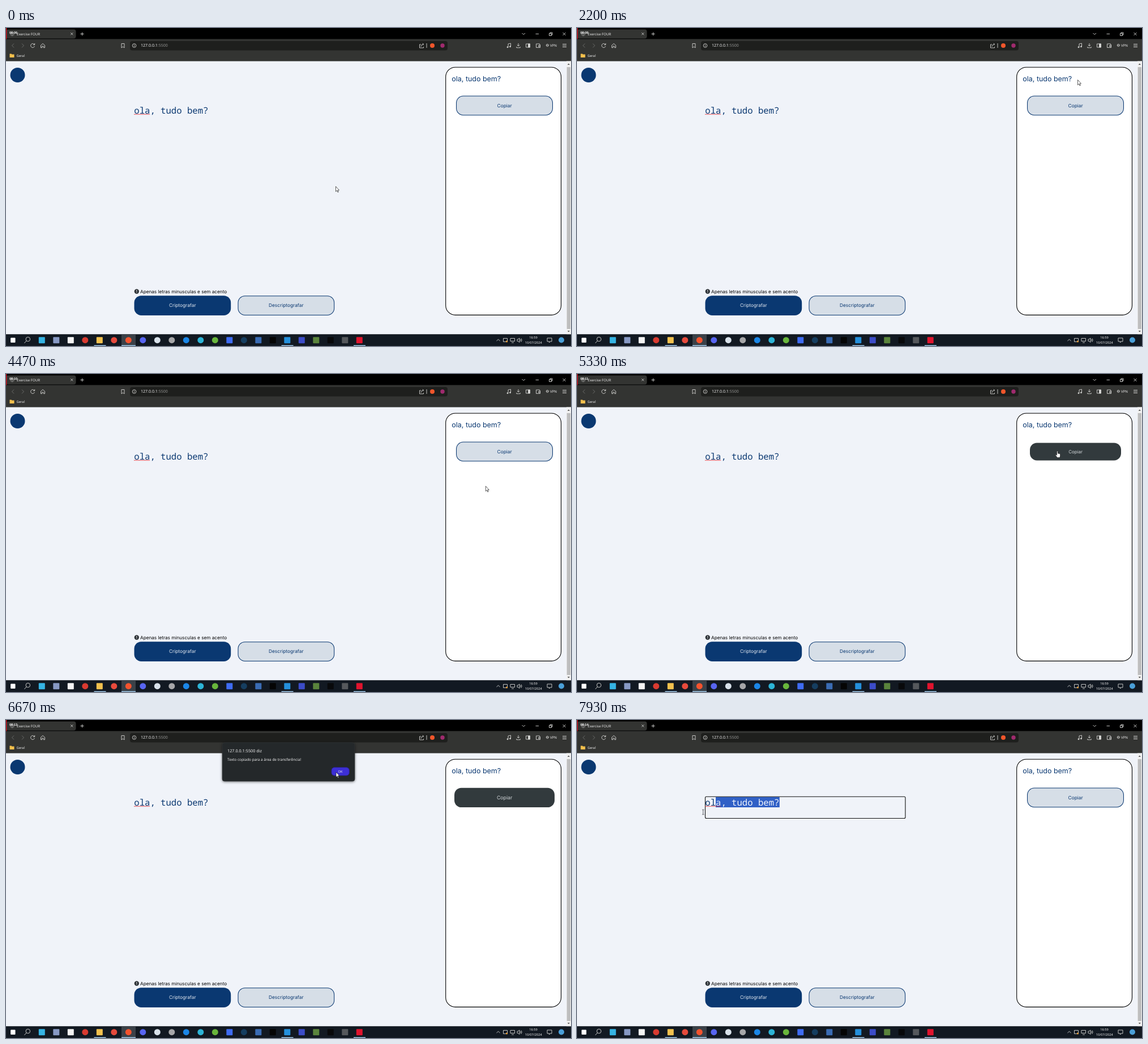
Animation of 998 by 561 pixels, one loop 8000 ms. Source, as an HTML page:

```html
<!DOCTYPE html>
<html lang="pt-BR">
<head>
<meta charset="utf-8">
<title>Exercise FOUR</title>
<style>
  html, body { margin: 0; width: 100%; height: 100%; overflow: hidden; background: #000; }
  svg { display: block; width: 998px; height: 561px; }
  text { font-family: "Noto Sans", sans-serif; font-size: 6.1px; fill: #eee; text-rendering: geometricPrecision; }
  .page text { font-family: Inter, sans-serif; font-size: 8.32px; fill: #0a3871; }
  .page .mono { font-family: "Noto Sans Mono", monospace; font-size: 15.62px; }
  .page .result { font-size: 12.48px; }
  .mid { text-anchor: middle; }
  .icons { fill: none; stroke: #d4d4d2; stroke-width: .9; }
  .dim { stroke: #70716f; }
</style>
</head>
<body>
<svg viewBox="0 0 998 561">
  <!-- browser window -->
  <rect width="998" height="20"/>
  <rect y="19.5" width="998" height="39" fill="#333432"/>
  <rect y="2.5" width="123.5" height="16" rx="4" fill="#333432"/>
  <rect x="219" y="23" width="561" height="16.5" rx="4" fill="#1e1f1d"/>
  <g class="icons">
    <g stroke="#8c8c8c" stroke-width=".7"><circle cx="11" cy="10.5" r="3.4"/><path d="M7.6 10.5h6.8M11 7q-3 3.5 0 7q3-3.5 0-7"/></g>
    <path d="M114.3 8.3l4 4m0-4l-4 4M131.500 10.500h6m-3-3v6M911.500 9l2.700 2.700L917 9M935.500 10.500h5.500M959.500 9.500h4v4h-4zM961 9.500V8h4v4h-1.500M983.500 8l5 5m0-5l-5 5"/>
    <path class="dim" d="M14 27.500L10.500 31l3.500 3.500M28 27.500l3.500 3.500-3.500 3.500"/>
    <path d="M50 29a3.500 3.500 0 1 0 .5 3M50.700 27v2.700H48M61.500 30.500L65 27.500l3.500 3v4.200h-2.200v-2.500h-2.600v2.500h-2.200zM204 27.500h5v7.500l-2.500-2-2.500 2z"/>
    <circle cx="226.500" cy="31" r="3.300"/><path d="M226.500 30.500v2.300M226.500 28.700v.9"/>
    <path d="M733 29h-2.500v6h7v-2M733 33q0-4 4.500-4.300M735.800 27l2 1.700-2 1.700M743 27v8"/>
    <path d="M887 33.500v-5.500l4.500-1v5.500"/><g fill="#d4d4d2"><circle cx="886" cy="33.800" r="1"/><circle cx="890.500" cy="32.800" r="1"/></g>
    <path d="M905 27v5m-2.200-2.200L905 32l2.200-2.200M901.800 33v1.800h6.400V33M918.500 28h7v6h-7z"/><path d="M922.500 28h3v6h-3z" fill="#d4d4d2"/>
    <path d="M936.500 28h6v1.500h1v5h-7zM940.500 31h3v1.800h-3z"/>
    <circle cx="956.300" cy="30.500" r="2"/><path d="M954.300 30.500h4" stroke-width=".6"/>
    <path d="M983 28.500h7M983 31h7M983 33.500h7"/>
  </g>
  <circle cx="753" cy="31" r="4" fill="#f1562b"/>
  <circle cx="771" cy="31" r="3.700" fill="#a02a6e"/>
  <path d="M6.500 45.500h3l1 1h4v5.500h-8z" fill="#f3c04c"/>
  <text x="19" y="12.500">Exercise FOUR</text>
  <text x="238" y="33.400" style="font-size:7.05px">127.0.0.1<tspan fill="#929391">:5500</tspan></text>
  <text x="18.500" y="51" style="font-size:5.8px">Geral</text>
  <text x="961" y="32.800">VPN</text>
  <path d="M.7 0v19.500" stroke="#c8101c" stroke-width="1.400"/>
  <text id="timer" x="6" y="9.700" style="font:bold 5.500px 'Liberation Sans',sans-serif;fill:#fff"></text>

  <!-- page -->
  <g class="page">
    <rect y="58.500" width="998" height="482" fill="#f0f3f9"/>
    <rect x="990" y="58.500" width="8" height="482" fill="#f1f1f1"/>
    <rect x="990.700" y="69" width="6.300" height="462" fill="#bebebe"/>
    <path d="M991.700 65l2.100-2.500 2.100 2.500zM991.700 534l2.100 2.500 2.100-2.500z" fill="#555"/>
    <circle cx="20.500" cy="83" r="13" fill="#0a3871"/>
    <rect id="outline" x="226.500" y="135.300" width="353.500" height="38.200" rx="2" fill="none" stroke="#101010" stroke-width="1.100"/>
    <text class="mono" x="226.300" y="150.700">ola, tudo bem?</text>
    <clipPath id="clip"><rect id="clipBox" y="135.800" height="18.400"/></clipPath>
    <g clip-path="url(#clip)">
      <rect x="226" y="135.800" width="133" height="18.400" fill="#3060c6"/>
      <text class="mono" x="226.300" y="150.700" style="fill:#f2f5fc">ola, tudo bem?</text>
    </g>
    <path id="squiggle" fill="none" stroke="#e0343c" stroke-width=".7"/>
    <circle cx="230.800" cy="464.800" r="4.200" fill="#30353a"/>
    <path d="M230.800 462.300v2.800m0 1v1.100" stroke="#fff" stroke-width="1"/>
    <text x="237" y="468" style="font-size:8.200px;fill:#000">Apenas letras minusculas e sem acento</text>
    <rect x="226.500" y="472.200" width="170.700" height="34.700" rx="12.500" fill="#0a3871"/>
    <text class="mid" x="311.800" y="492.400" style="fill:#dfe5ee">Criptografar</text>
    <rect x="410" y="472.700" width="169.700" height="33.700" rx="12" fill="#d6dee7" stroke="#0a3871" stroke-width="1.050"/>
    <text class="mid" x="494.800" y="492.400">Descriptografar</text>
    <rect x="776.700" y="69.200" width="203.800" height="437.200" rx="17" fill="#fff" stroke="#000" stroke-width="1.100"/>
    <text class="result" x="787.300" y="93.600">ola, tudo bem?</text>
    <rect id="copy" rx="12.300"/>
    <text id="copyLabel" class="mid" y="3">Copiar</text>
  </g>

  <!-- taskbar -->
  <rect y="540.500" width="998" height="20.500" fill="#121922"/>
  <rect x="204" y="540.500" width="25" height="20.500" fill="#3b4148"/>
  <path d="M155.500 560.200h21M204 560.200h25M486.500 560.200h21M614 560.200h21" stroke="#9cc4e4" stroke-width="1.400"/>
  <g id="apps"></g>
  <g class="icons" stroke-width="1">
    <circle cx="38.800" cy="549" r="3.800"/><path d="M36 552l-3.700 4"/>
    <path d="M866.500 552l3-2.700 3 2.700M878.500 547.500h7v6h-7zM891 547.500h7.500v5H891zM893 555h4M956 547h8v6h-3l-1.500 2v-2H956z"/>
    <path d="M903 549h1.500l2.500-2v7.500l-2.500-2H903zM908.500 549q1.300 1.700 0 3.500M910 547.700q2.300 3 0 6"/>
    <circle cx="884.500" cy="553" r="1.500" fill="#f0a030" stroke="none"/>
  </g>
  <text class="mid" x="931.500" y="548.200" style="font-size:5.600px">16:59</text>
  <text class="mid" x="931.700" y="557.300" style="font-size:5.650px">10/07/2024</text>

  <!-- alert -->
  <g id="alert">
    <rect x="382" y="40" width="234" height="68" rx="4" fill="#24282a" stroke="#34383a" stroke-width=".6" style="filter:drop-shadow(0 1px 2px #0008)"/>
    <text x="391" y="57" style="font-size:7.270px">127.0.0.1:5500 diz</text>
    <text x="391" y="72.300" style="font-size:6.450px">Texto copiado para a área de transferência!</text>
    <rect x="575" y="83.700" width="31.300" height="14.300" rx="5" fill="#3d2fd6" stroke="#2a2290"/>
    <text class="mid" x="590.600" y="93" style="font-size:5.700px">OK</text>
  </g>
  <path id="cursor"/>
</svg>
<script>
const $ = id => document.getElementById(id);
const set = (id, attrs) => { for (const k in attrs) $(id).setAttribute(k, attrs[k]); };

// Taskbar apps at even spacing: "s" square or "c" circle, then colour.
const apps = `s#fff - s#35b4e4 s#8799c4 s#f4f4f4 c#d83a30 s#f2c14e c#e64a3c c#f4532e c#5865f2 c#d8e1ea c#a6a6a8
  c#1b86e6 c#2cb4d6 c#68b63c s#3f6cf2 c#163e60 s#3a6cb4 s#050505 s#2490dc s#3c4cc8 s#5a843c s#08090b s#55585c s#e0142e`;
apps.split(/\s+/).forEach((app, i) => {
  if (app === '-') return;
  const r = i ? 5.5 : 4.2;
  $('apps').innerHTML += `<rect x="${12.3 + 25.5 * i - r}" y="${550.7 - r}" width="${2 * r}" height="${2 * r}"
    rx="${app[0] === 'c' ? r : 1}" fill="${app.slice(1)}"/>`;
});
$('apps').innerHTML += '<circle cx="981" cy="550.500" r="5" fill="#4a9fd8"/>';
set('squiggle', { d: 'M226 153' + 'l1-1.300l1 1.300'.repeat(14) });

const LOOP = 8000;
const pointer = [[0, 582.5, 279.5], [1400, 582.5, 279.5], [1900, 868, 96], [2200, 884.5, 91.5], [2270, 884.5, 91.5],
  [2670, 862, 93], [2870, 862, 93], [3330, 848, 201], [4400, 848, 201], [4470, 847.3, 197.8], [5000, 848.5, 136],
  [5930, 848.5, 136], [6600, 583, 92], [7130, 583, 92], [7265, 577.3, 101], [7730, 356, 150], [7790, 356, 150],
  [7864, 245, 160], [7925, 222.8, 162.5]];
const hover = [[1730, 0], [1800, .8], [2050, 0], [2930, 0], [3050, .5], [3330, 0], [4760, 0], [5060, 1], [7225, 1], [7525, 0]];
const press = [[5030, 0], [5330, 1], [5430, 1], [5730, 0]];
const shapes = {
  arrow: 'M0 0V9l2.100-1.900 1.400 3.200 1.300-.6L3.400 6.600H6z',
  hand: 'M-.9 6.500V.8a.9.9 0 0 1 1.800 0V4l3 .6q1.200.3 1.200 1.500v2.200q-.2 2.500-1.400 3.200H0q-.8-1.200-2.800-3.400q-.8-1.200.2-1.600q.9-.2 1.700.8z',
  beam: 'M-1.700-4.300h1.200l.5.400.5-.4h1.200M-1.700 4.300h1.200l.5-.4.5.4h1.200M0-4v8'
};

const mix = (a, b, f) => a + (b - a) * f;
const smooth = x => x * x * (3 - 2 * x);
const easeOut = x => 1 - (1 - x) ** 2;
const colour = (a, b, f) => `rgb(${a.map((v, i) => Math.round(mix(v, b[i], f)))})`;

function along(keys, t, ease) {
  const i = keys.findIndex(k => k[0] > t);
  if (i < 1) return keys.at(i).slice(1);
  const [t0, ...from] = keys[i - 1], [t1, ...to] = keys[i];
  return from.map((v, j) => mix(v, to[j], ease((t - t0) / (t1 - t0))));
}

function drawCopy(t) {
  const [h] = along(hover, t, easeOut), [p] = along(press, t, easeOut);
  const border = 1.05 * Math.min(1, (1 - h) * 4);
  const w = mix(mix(171, 177, h), 161, p) - border;
  const height = mix(mix(34.7, 34.3, h), 31, p) - border;
  const scale = mix(mix(1, 1.055, h), .96, p);
  const navy = [10, 56, 113];
  set('copy', {
    x: 880.5 - w / 2, y: 136.9 - height / 2, width: w, height,
    fill: colour([214, 222, 231], [50, 58, 61], h),
    stroke: colour(navy, [200, 214, 232], h), 'stroke-width': border
  });
  set('copyLabel', { transform: `translate(880.6 ${mix(136.8, 137.3, h)}) scale(${scale})` });
  $('copyLabel').style.fill = colour(navy, [208, 213, 216], h);
}

function drawPointer(t) {
  const [x, y] = along(pointer, t, smooth);
  const onButton = x > 795 && x < 966 && y > 119 && y < 154;
  const inText = t > 7270 && x < 580 && y > 135;
  set('cursor', {
    d: shapes[inText ? 'beam' : onButton ? 'hand' : 'arrow'],
    transform: `translate(${x} ${y})`, fill: inText ? 'none' : '#fff', stroke: '#1c1c1c', 'stroke-width': .7
  });
}

function drawSelection(t) {
  const cell = 9.375, left = 226.3;
  const [x] = along(pointer, t - 66, smooth);
  const start = left + cell * Math.min(14, Math.round((x - left) / cell));
  set('clipBox', { x: start, width: t > 7840 ? Math.max(0, 357.8 - start) : 0 });
  set('outline', { visibility: t > 7780 ? 'visible' : 'hidden' });
}

function frame(now) {
  const t = now % LOOP;
  const seconds = 6 + Math.floor((t + 332) / 1000);
  $('timer').textContent = '00:' + String(seconds).padStart(2, '0');
  set('alert', { opacity: t < 5925 ? 0 : Math.max(0, Math.min(1, (7130 - t) / 130)) });
  drawCopy(t);
  drawSelection(t);
  drawPointer(t);
  requestAnimationFrame(frame);
}
requestAnimationFrame(frame);
</script>
</body>
</html>
```
